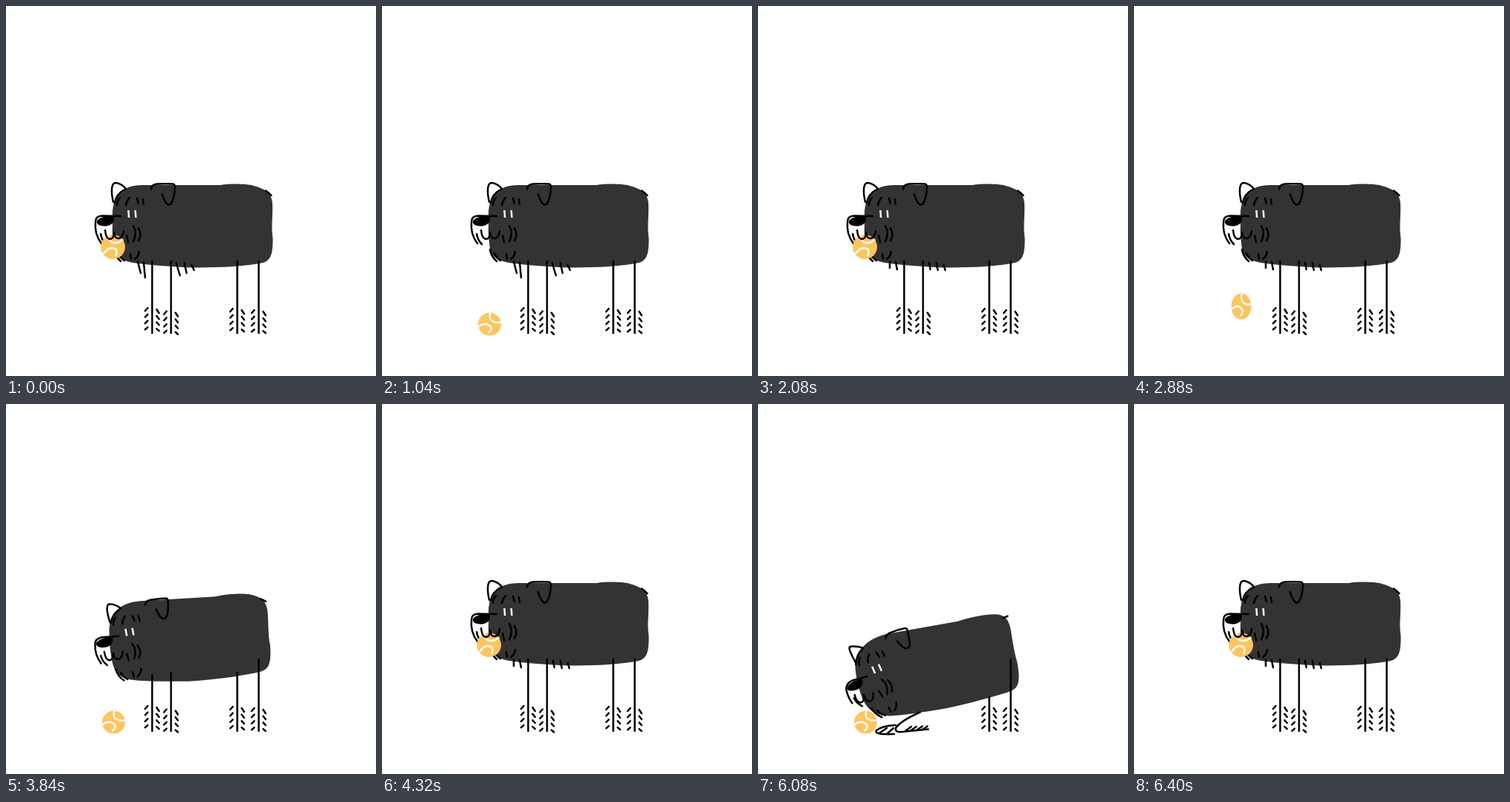
An HTML page that plays this animation: 500x500 px, repeating every 6.48 s.

```html
<!DOCTYPE html>
<html lang="en">
<head>
<meta charset="utf-8">
<title>Dog and ball</title>
<style>
  html, body { margin: 0; width: 100%; height: 100%; overflow: hidden; background: #fff; }
  svg { display: block; width: 100vw; height: 100vh; }
  .ink { fill: none; stroke: #000; stroke-width: 2.5; stroke-linecap: round; stroke-linejoin: round; }
</style>
</head>
<body>
<svg viewBox="0 0 500 500">
  <path id="body" fill="#333"/>
  <path id="tail" class="ink"/>
  <path id="fur" class="ink"/>
  <path id="hind" class="ink"/>
  <path id="front" class="ink"/>
  <path id="folded" class="ink" d="M186 434Q167 435 160 441Q155 447 184 446M174 438L165 444M183 438L175 445M219 416.5Q193 428 186 438Q185 444 194 443L230 439.5M207 436L199 442M214 436L206 441.5M222 435.5L214 441M229 435.5L222 440"/>
  <path id="farEar" class="ink"/>
  <path id="nearEar" class="ink"/>
  <g id="head">
    <path class="ink" d="M154 259Q150 263 150 269M167 259Q163 263 162 269M177 260L179 267M185 261L186 268M172 297Q178 307 172 318M179 300Q184 309 179 317M163 310L165 319M180 332Q179 339 174 342M168 335L169 342M128 308Q129 316 135 322M146 329Q147 338 155 345M152 334Q154 340 160 344"/>
    <path id="eyes" fill="none" stroke="#fff" stroke-width="2.5"/>
  </g>
  <path id="muzzle" class="ink"/>
  <path id="nose"/>
  <g id="ball">
    <circle r="15.5" fill="#fdc55f"/>
    <path fill="none" stroke="#fff" stroke-width="2.3" d="M-15 3Q-5 -3 0 2Q5 6 -2 12M1 -16Q-2 -7 4 -4Q9 -1 16 -3"/>
  </g>
  <path id="mouth" class="ink"/>
</svg>
<script>
const FRAME = 80, CYCLE = 2160, LOOP = 3 * CYCLE;
const start = performance.now();
const set = (id, name, value) => document.getElementById(id).setAttribute(name, value);

// Soft parts: outline standing, outline bent down
const SHAPES = {
  body: [
    "M144 285C143 259 154 242 185 242L290 242C302 240 325 240 335 243C350 247 359 253 360 266C361 283 358 297 360.5 313C361 338 357 346 342 348C310 353 280 353.5 250 353.5C220 352 190 350 172 347C150 343 146 335 145 320C143 305 144 300 144 285Z",
    "M129.5 372C127 352 142 331 172 323L266 303C282 297 305 291 320 291.5C331 292 335 298 338 310C341 326 344 342 348.5 355C354 383 352 392 336 397C305 407 270 418 240 424C215 429 195 433 180 434.5C158 436 146 425 139 408C134 395 131 385 129.5 372Z"
  ],
  tail: ["M351 249.5Q355 252 358.5 256", "M327.5 296Q330 295 333.5 292"],
  farEar: [
    "M145 265C141 248 143 238 149 239C154 240 159 243 162 247C154 251 148 258 147 266",
    "M130 365C122 352 117 344 121 343.5C127 342.5 133 343 138.5 344.5C133 350 130 357 129.5 367"
  ],
  nearEar: [
    "M196 247Q197 241 204 240.5Q216 240 226 240.5Q229 241 228 249Q227 262 222 268Q216 271 211 254",
    "M168 329Q169 323 175 321Q185 316 194 314Q197 313 198 320Q203 335 201 339Q196 346 184 332"
  ],
  muzzle: [
    "M155 284Q142 283.5 130 283.5Q121 284 121 291Q119 308 129 321",
    "M146 383Q136 387 128 389Q118 394 119 403Q122 412 127 419"
  ],
  nose: [
    "M122.5 291Q126 283.5 146 284Q147 296 135 297.5Q123 298 122.5 291Z",
    "M119.5 400Q124 390 140 387Q143 397 133 402Q121 406 119.5 400Z"
  ],
  mouth: [
    "M134 303Q135 315 141 315Q146 314 146 306Q147 315 153 314Q158 312 159 304",
    "M130 409Q133 420 139 419Q144 417 142 408Q146 419 152 417Q157 413 155 406"
  ]
};

// Ball while dropping, one pose per step: y, width, height, angle
const DROP = [
  [334, 1, 1.08, -18], [358, .92, 1.12, -12], [398, .88, 1.14, -6],
  [434, 1.27, .76, 0], [416, .92, 1.1, 0], [406, .87, 1.13, 0],
  [419, .94, 1.05, 0], [433, 1.12, .86, 0], [427, .98, 1.03, 0]
];
const BEND = [.3, .85, 1, .5, -.08];

// Blend every number of two paths with the same commands
function blend([from, to], k) {
  const ends = to.match(/[\d.]+/g);
  let i = 0;
  return from.replace(/[\d.]+/g, v => (+v + (ends[i++] - v) * k).toFixed(2));
}

function leg(x, top, tuft) {
  let d = `M${x} ${top}V442`;
  for (let i = 0; i < 4; i++) {
    const y = tuft + 8.7 * i;
    d += `M${x - 6} ${y}l-3.5 ${4 - i * .3}M${x + 6} ${y + 2}l3.3 ${5 - i * .7}`;
  }
  return d;
}

function eyes(n) {
  if (n === 16) return "M161.5 281.5h7.5M172 281.5h7.5";
  const h = n === 17 ? 2.5 : 5;
  return [165.7, 175].map(x => `M${x - .3} ${281 - h}L${x + .4} ${281 + h}`).join("");
}

function placeBall(n, head) {
  let move;
  if (n >= 4 && n < 13) {
    const [y, w, h, a] = DROP[n - 4];
    move = `translate(145 ${y}) scale(${w} ${h}) rotate(${a})`;
  } else if (n >= 13 && n < 23) {
    move = "translate(145.5 430)";
  } else if (n === 23) {
    move = "translate(145.3 430.8) rotate(-22)";
  } else {
    move = `${head} translate(144.5 325.6) scale(1.06) rotate(-26)`;
  }
  set("ball", "transform", move);
}

function draw(time) {
  const t = time % LOOP;
  const n = Math.floor(t % CYCLE / FRAME);
  const k = BEND[n - 21] || 0;
  const lift = Math.max(k, 0);
  const down = k > .6;
  const head = `translate(${170 - 11.5 * k} ${281 + 90.5 * k}) rotate(${-23 * k}) translate(-170 -281)`;

  for (const id in SHAPES) set(id, "d", blend(SHAPES[id], k));
  set("head", "transform", head);
  set("eyes", "d", eyes(n));

  set("hind", "d", leg(312.5, 345 + 60 * lift, 409) + leg(341.5, 345, 411));
  set("front", "d", down ? "" : leg(197.5, 345 + 70 * lift, 408) + leg(223, 345 + 60 * lift, 412.5));
  set("folded", "visibility", down ? "visible" : "hidden");

  const fur = t < 1280
    ? "M178 345L182 361M186 346L188 367M230 347L235 364M241 347L244 361M251 350L254 357"
    : "M178 345V354M186 346L188 356M231 347L233 356M241 347L243 357M251 350L253 357";
  set("fur", "d", k > 0 ? "" : fur);
  placeBall(n, head);
}

function tick() {
  draw(performance.now() - start);
  requestAnimationFrame(tick);
}
tick();
</script>
</body>
</html>
```
